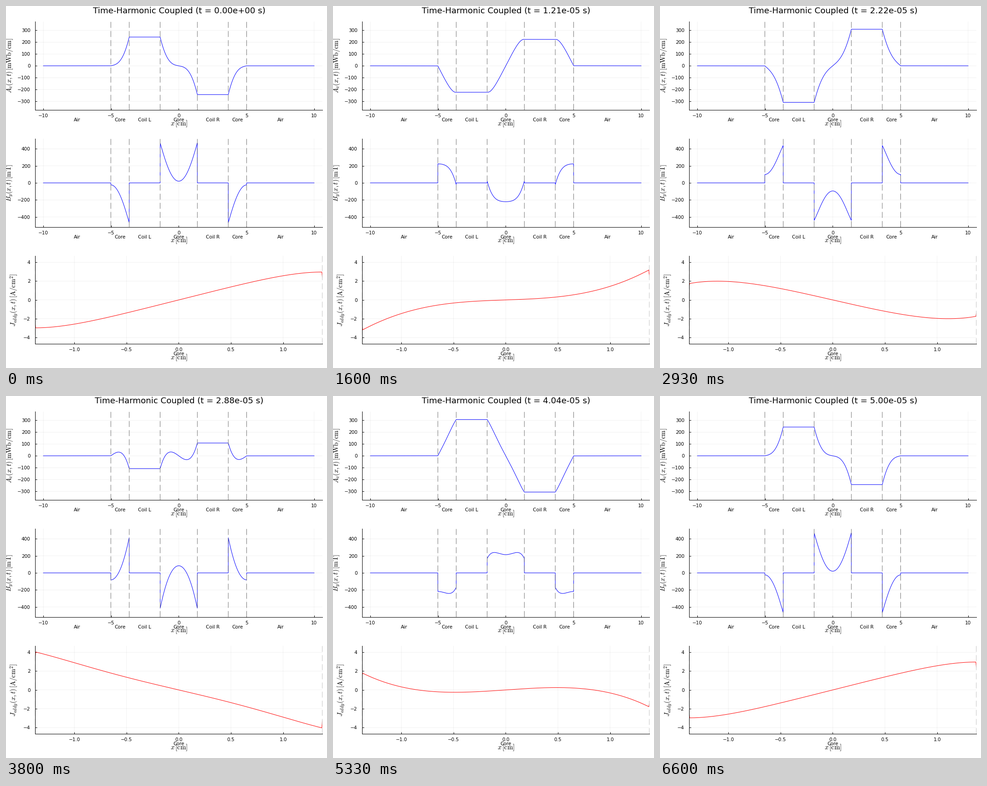
A matplotlib script for the animation above (6.67 s loop, 705 by 794 pixels).

```python
import numpy as np
import matplotlib.pyplot as plt
from matplotlib.animation import FuncAnimation

W, H, DPI = 705, 794, 96
FRAMES, PERIOD = 100, 5e-5

plt.rcParams.update({
    "font.family": "DejaVu Sans", "font.size": 7.8,
    "mathtext.fontset": "cm", "axes.linewidth": 0.75,
})

# Geometry in cm, magnetic flux density in mT
LEG, COIL, CORE, EDGE = 1.375, 3.6575, 5.015, 10.0
B_EDGE, MU_R, GAP = 469.0, 1480.0, 0.004
K = (1 - 1j) * 1.49 / LEG
J_SCALE = 2.97 / (B_EDGE * K * np.tanh(K * LEG)).real

# Phasors for x > 0; A and J are odd in x, B is even
xc = np.linspace(0, LEG - GAP, 160)
xo = np.linspace(COIL + GAP, CORE - GAP, 100)
xa = np.array([CORE + GAP, EDGE])

a_coil = -B_EDGE * np.tanh(K * LEG) / K
air = EDGE - CORE
ratio = MU_R / (air * K)
width = K * (CORE - COIL)
a_air = a_coil / (np.cosh(width) + ratio * np.sinh(width))
depth = K * (CORE - xo)

x_half = np.concatenate([xc, [LEG, COIL], xo, xa])
a_half = np.concatenate([
    -B_EDGE * np.sinh(K * xc) / (K * np.cosh(K * LEG)),
    [a_coil, a_coil],
    a_air * (np.cosh(depth) + ratio * np.sinh(depth)),
    a_air * (EDGE - xa) / air,
])
b_half = np.concatenate([
    B_EDGE * np.cosh(K * xc) / np.cosh(K * LEG),
    [0, 0],
    a_air * K * (np.sinh(depth) + ratio * np.cosh(depth)),
    np.full(2, a_air / air),
])
xj = np.append(xc, LEG)
j_half = J_SCALE * B_EDGE * K * np.sinh(K * xj) / np.cosh(K * LEG)
j_half[-1] *= 0.81


def mirror(half, sign):
    return np.concatenate([sign * half[:0:-1], half])


fig = plt.figure(figsize=(W / DPI, H / DPI), dpi=DPI, facecolor="white")


def label(x, y, text, size=7.8, **kw):
    kw = {"ha": "center", "va": "center", **kw}
    return fig.text(x / W, 1 - y / H, text, fontsize=size, **kw)


def panel(mid, xlim, ylim, xticks, yticks, walls, wall_color, ylabel, ylabel_x):
    left, right, half = 64.2, 694.6, 96.7
    ax = fig.add_axes([left / W, 1 - (mid + half) / H,
                       (right - left) / W, 2 * half / H])
    ax.set(xlim=(-xlim, xlim), ylim=(-ylim, ylim), xticks=xticks, yticks=yticks)
    ax.spines[["top", "right"]].set_visible(False)
    ax.grid(color="black", alpha=0.1, lw=0.4, snap=False)
    ax.set_axisbelow(True)
    ax.tick_params(direction="in", length=3, width=0.75)
    ax.tick_params(axis="x", pad=6)
    ax.tick_params(axis="y", pad=8)
    for wall in walls:
        for x in (-wall, wall):
            ax.plot([x, x], [-ylim, ylim], color=wall_color, lw=0.75,
                    dashes=(13, 7), zorder=2.45, snap=False, clip_on=False)
    label(379.4, mid + 126.5, r"$x\,\mathrm{[cm]}$", 11)
    label(ylabel_x, mid, ylabel, 11, rotation=90,
          rotation_mode="anchor", va="baseline")
    return ax


def regions(mid, names):
    for name, x in names:
        label(379.4 + 29.74 * x, mid + 118.5, name)


ALL = [("Air", -7.51), ("Core", -4.336), ("Coil L", -2.516), ("Core", 0),
       ("Coil R", 2.516), ("Core", 4.336), ("Air", 7.51)]
MIDS = [131.2, 388.0, 644.7]
WIDE = dict(xlim=10.6, xticks=range(-10, 11, 5),
            walls=(LEG, COIL, CORE), wall_color="#747474")

ax_a = panel(MIDS[0], ylim=372.5, yticks=range(-300, 301, 100),
             ylabel=r"$A_z(x,t)\,\mathrm{[mWb/cm]}$", ylabel_x=12, **WIDE)
ax_b = panel(MIDS[1], ylim=517, yticks=range(-400, 401, 200),
             ylabel=r"$B_y(x,t)\,\mathrm{[mT]}$", ylabel_x=12, **WIDE)
ax_j = panel(MIDS[2], xlim=LEG, ylim=4.69, xticks=np.arange(-1, 1.1, 0.5),
             yticks=range(-4, 5, 2), walls=(LEG,), wall_color="#c4c4c4",
             ylabel=r"$J_{eddy}(x,t)\,\mathrm{[A/cm^2]}$", ylabel_x=22)
regions(MIDS[0], ALL)
regions(MIDS[1], ALL)
regions(MIDS[2], [("Core", 0)])

title = label(380, 15.7, "", 13.7, va="baseline")

curves = []
for ax, x, half, sign, color in [(ax_a, x_half, a_half, -1, "blue"),
                                 (ax_b, x_half, b_half, 1, "blue"),
                                 (ax_j, xj, j_half, -1, "red")]:
    line, = ax.plot([], [], color=color, lw=0.75, zorder=2.4, snap=False)
    line.set_xdata(mirror(x, -1))
    curves.append((line, mirror(half, sign)))


def draw(i):
    t = PERIOD * i / (FRAMES - 1)
    turn = np.exp(2j * np.pi * t / PERIOD)
    for line, phasor in curves:
        line.set_ydata((phasor * turn).real)
    title.set_text(f"Time-Harmonic Coupled (t = {t:.2e} s)")
    return [line for line, _ in curves] + [title]


anim = FuncAnimation(fig, draw, frames=FRAMES, interval=66.6, repeat=True,
                     repeat_delay=0, init_func=lambda: draw(0), blit=False)
plt.show()
```
